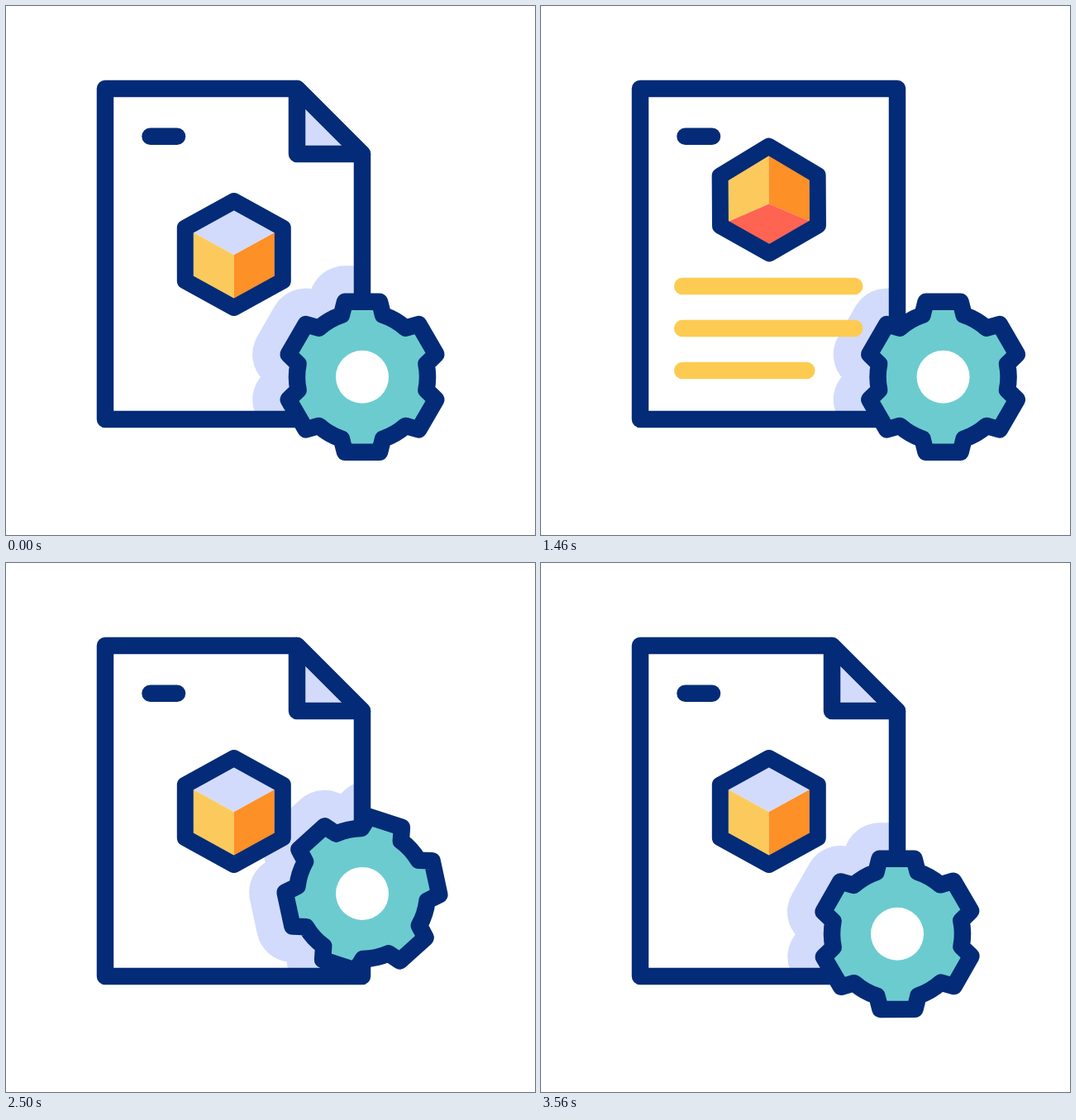
Animation of 640x640 px, one loop 3600 ms. Source, as an HTML page with a canvas:

```html
<!DOCTYPE html>
<html lang="en">
<head>
<meta charset="utf-8">
<title>Document and gear</title>
<style>
  html, body { margin: 0; width: 100%; height: 100%; overflow: hidden; background: #fff; }
  canvas { display: block; width: 640px; height: 640px; }
</style>
</head>
<body>
<canvas id="stage" width="640" height="640"></canvas>
<script>
const ctx = document.getElementById('stage').getContext('2d');
const LOOP = 3600, RAD = Math.PI / 180;
const NAVY = '#032b77', LAVENDER = '#d2dbfb', YELLOW = '#fdcb52', TEAL = '#6ccbcf';
ctx.lineCap = ctx.lineJoin = 'round';

const progress = (t, from, to) => Math.min(1, Math.max(0, (t - from) / (to - from)));
const ease = (t, from, to) => {
  const p = progress(t, from, to);
  return p * p * (3 - 2 * p);
};

function trace(points) {
  ctx.beginPath();
  points.forEach(([x, y]) => ctx.lineTo(x, y));
  ctx.closePath();
}

function fill(points, color) {
  trace(points);
  ctx.fillStyle = color;
  ctx.fill();
}

function stroke(color, width = 20.5) {
  ctx.strokeStyle = color;
  ctx.lineWidth = width;
  ctx.stroke();
}

function bar(x1, x2, y, color) {
  ctx.beginPath();
  ctx.moveTo(x1, y);
  ctx.lineTo(x2, y);
  stroke(color);
}

function pagePoints(fold) {
  return [[120, 100], [431 - fold, 100], [431, 100 + fold], [431, 500], [120, 500]];
}

function gearPath({ x, y, angle }) {
  ctx.beginPath();
  for (let i = 0; i < 6; i++) {
    const a = (angle + i * 60 - 90) * RAD;
    for (const side of [-13, 13]) {
      const b = a + side * RAD;
      ctx.lineTo(x + 93.4 * Math.cos(b), y + 93.4 * Math.sin(b));
    }
    ctx.arc(x, y, 79, a + 18.5 * RAD, a + 41.5 * RAD);
  }
  ctx.closePath();
}

function drawGear(gear) {
  gearPath(gear);
  ctx.fillStyle = TEAL;
  ctx.fill();
  stroke(NAVY);
  ctx.beginPath();
  ctx.arc(gear.x, gear.y, 32, 0, 7);
  ctx.fillStyle = '#fff';
  ctx.fill();
}

function drawShadow(gear, page) {
  ctx.save();
  trace(page);
  ctx.clip();
  gearPath(gear);
  ctx.fillStyle = LAVENDER;
  ctx.fill();
  stroke(LAVENDER, 87);
  ctx.restore();
}

// turn: 0 shows the top face, 1 shows the bottom face
function drawCube(cy, turn, lean) {
  const w = 49, tilt = (33.4 - 65 * turn) * RAD;
  const half = (31.8 + 2.2 * turn) * Math.cos(tilt);
  const depth = w * Math.sin(tilt);
  const pinch = 8 * Math.sin(2.6 * turn * turn);
  const topL = [-w, pinch - half], topR = [w, pinch - half];
  const lowL = [-w, half - pinch * .7], lowR = [w, half - pinch * .7];
  const topFront = [0, depth - half], topBack = [0, -depth - half];
  const lowFront = [0, half + depth], lowBack = [0, half - depth];
  const outline = tilt > 0
    ? [topBack, topR, lowR, lowFront, lowL, topL]
    : [topFront, topR, lowR, lowBack, lowL, topL];

  ctx.save();
  ctx.translate(275.8, cy);
  ctx.rotate(lean * RAD);
  fill([topL, topFront, lowFront, lowL], '#fcca5c');
  fill([topR, topFront, lowFront, lowR], '#fd9026');
  if (tilt > 0) fill([topL, topBack, topR, topFront], LAVENDER);
  else fill([lowL, lowFront, lowR, lowBack], '#ff6352');
  trace(outline.map(([x, y]) => [x * 1.204, y * 1.204]));
  stroke(NAVY, 20);
  ctx.restore();
}

function draw(t) {
  const fold = 79 * (1 - ease(t, 120, 400) + ease(t, 1640, 2000));
  const page = pagePoints(fold);
  const lift = ease(t, 120, 880) - ease(t, 1600, 2060);
  const turn = .66 * ease(t, 120, 800) + .34 * ease(t, 800, 1600) - ease(t, 1600, 2220);
  const lean = t < 1600 ? -3.7 * Math.sin(Math.PI * turn) : 0;

  const hop = ease(t, 2270, 2520) - ease(t, 2520, 2920)
            + ease(t, 2920, 3320) - ease(t, 3320, 3565);
  const spin = progress(t, 2250, 3600);
  const gear = {
    x: 431 + 77 * (ease(t, 1200, 1600) - ease(t, 1880, 2280)),
    y: 448.8 - 49.7 * hop,
    angle: 360 * spin ** 2 / (spin ** 2 + (1 - spin) ** 2)
  };

  ctx.fillStyle = '#fff';
  ctx.fillRect(0, 0, 640, 640);
  drawShadow(gear, page);
  bar(174.5, 207, 157.7, NAVY);

  for (let i = 0; i < 3; i++) {
    const start = 400 + 400 * i, end = 1600 + 100 * (3 - i);
    if (t <= start || t >= end) continue;
    const grown = ease(t, start, start + 400) - ease(t, end - 140, end);
    bar(171.2, 171.2 + 208 * grown, 339 + 51 * i, YELLOW);
  }

  drawCube(300.5 - 66 * lift, turn, lean);

  if (fold > .5) {
    fill([page[1], page[2], [431 - fold, 100 + fold]], LAVENDER);
    stroke(NAVY);
  }
  trace(page);
  stroke(NAVY);
  drawGear(gear);
}

function frame() {
  draw(performance.now() % LOOP);
  requestAnimationFrame(frame);
}
frame();
</script>
</body>
</html>
```
